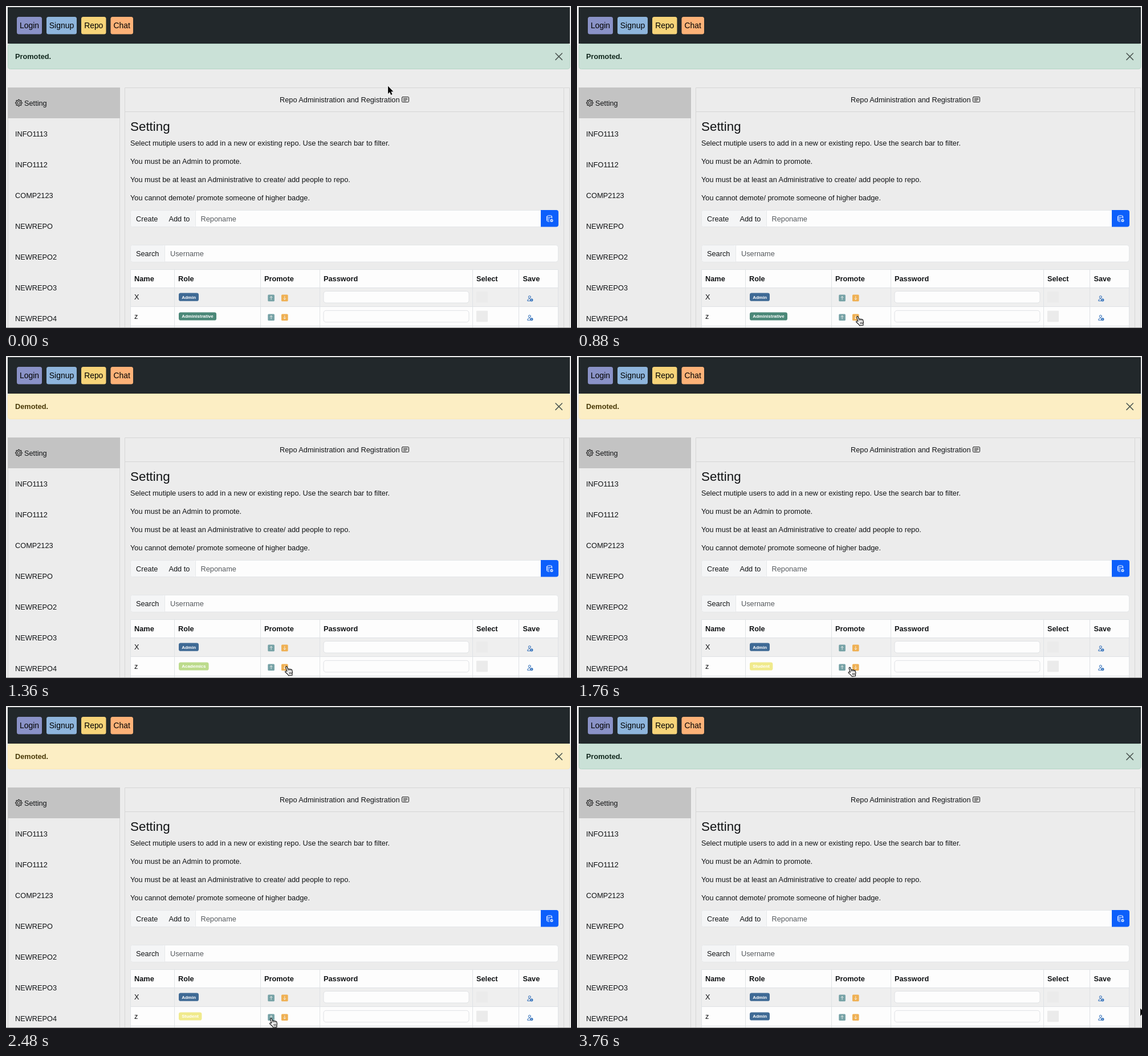
Animation of 991x565 px, one loop 3840 ms. Source, as an HTML page:

```html
<!DOCTYPE html>
<html lang="en">
<head>
<meta charset="utf-8">
<title>Repo administration</title>
<style>
  html, body { margin: 0; width: 100%; height: 100%; overflow: hidden; background: #ececec; }
  svg { display: block; font: 12.75px "Liberation Sans", Arial, sans-serif; }
  text { fill: #111315; white-space: pre; }
  .bold { font-weight: 700; }
  .mid { text-anchor: middle; }
  .nav { font-size: 13.9px; fill: #000; }
  .hint { fill: #55595d; }
  .badge { font-size: 8px; font-weight: 700; fill: #fff; }
  .line { fill: none; stroke: #d6d6d6; }
  .grid { fill: none; stroke: #dfe2e5; }
  .icon { fill: none; stroke: #1a1a1a; stroke-linecap: round; stroke-linejoin: round; }
</style>
</head>
<body>
<svg id="stage" width="991" height="565" viewBox="0 0 991 565"></svg>
<script>
const LOOP = 3840, STEP = 80;
const stage = document.getElementById('stage');

const rect = (x, y, w, h, fill, r = 0, extra = '') =>
  `<rect x="${x}" y="${y}" width="${w}" height="${h}" rx="${r}" fill="${fill}" ${extra}/>`;
const text = (x, y, s, cls = '') => `<text x="${x}" y="${y}" class="${cls}">${s}</text>`;
const path = (d, cls, extra = '') => `<path d="${d}" class="${cls}" ${extra}/>`;

function navbar() {
  const items = [['Login', 19, 44, '#8a92c7'], ['Signup', 71, 53, '#8eb5dc'],
                 ['Repo', 132, 43.5, '#f7d479'], ['Chat', 183.5, 39.5, '#fdb278']];
  return rect(3, 2, 986, 64, '#22282b') + items.map(([s, x, w, c]) =>
    rect(x, 19, w, 30.5, c, 3.5) + text(x + w / 2, 38.8, s, 'nav mid')).join('');
}

function alertBar() {
  return rect(3.5, 66.5, 985.5, 44, '#cae1d7', 4, 'id="bar" stroke="#b4d5c5"') +
    text(16, 93, '', 'bold').replace('<text', '<text id="note"') +
    path('M964 83l11.4 11.4M975.4 83L964 94.4', 'icon', 'style="stroke:#4a5450;stroke-width:1.5"');
}

function gear(cx, cy) {
  let d = '';
  for (let i = 0; i <= 64; i++) {
    const a = i / 64 * 2 * Math.PI, r = 5.1 + 0.75 * Math.tanh(3 * Math.cos(8 * a));
    d += `${i ? 'L' : 'M'}${(cx + r * Math.cos(a)).toFixed(2)} ${(cy + r * Math.sin(a)).toFixed(2)}`;
  }
  return path(d + 'Z', 'icon', 'stroke-width="1.1"') +
    `<circle cx="${cx}" cy="${cy}" r="2.4" class="icon" stroke-width="1"/>`;
}

function sidebar() {
  const names = ['INFO1113', 'INFO1112', 'COMP2123', 'NEWREPO', 'NEWREPO2', 'NEWREPO3', 'NEWREPO4'];
  return path('M3.5 565V143.5H199.5V565', 'line') +
    rect(3, 143, 197, 54, '#c3c3c3') + gear(22.4, 170) + text(32, 174.7, 'Setting') +
    names.map((s, i) => text(16, 228.5 + 54 * i, s)).join('');
}

function card() {
  const lines = ['Select mutiple users to add in a new or existing repo. Use the search bar to filter.',
    'You must be an Admin to promote.',
    'You must be at least an Administrative to create/ add people to repo.',
    'You cannot demote/ promote someone of higher badge.'];
  return path('M208.5 565V143.5H978.5V565M208 185.5H979M979 143.5H988.5V565', 'line') +
    text(480, 168.8, 'Repo Administration and Registration') +
    rect(694.5, 159.6, 12, 9, 'none', 1.3, 'class="icon" stroke-width="1"') +
    path('M697 162.2h7M697 164.2h7M697 166.2h4.5', 'icon', 'stroke-width=".9"') +
    `<text x="218" y="218.8" style="font-size:22.4px">Setting</text>` +
    lines.map((s, i) => text(218, 245 + 31.9 * i, s)).join('');
}

function forms() {
  const field = (y, h, split) => rect(218.5, y, 750, h, '#fdfdfd', 4, 'stroke="#e4e6e8"') +
    rect(219, y + .5, split - 219, h - 1, '#f4f5f6', 3.5) +
    path(`M${split + .5} ${y}v${h}`, 'line', 'style="stroke:#e6e8ea"');
  const db = 'M948.5 369.2c0-2.3 9-2.3 9 0s-9 2.3-9 0v7.2c0 1.3 2 1.8 4.2 1.8' +
    'M957.5 369.2v3.2M948.5 371.7c0 1.3 2 1.7 4.5 1.7M948.5 374.2c0 1.2 2 1.6 3.8 1.6';
  return field(358.5, 29, 332) +
    text(228, 377.5, 'Create') + text(285.5, 377.5, 'Add to') + text(341.5, 377.5, 'Reponame', 'hint') +
    path('M938 358H965a4 4 0 0 1 4 4V383.5a4 4 0 0 1-4 4H938Z', '', 'fill="#0c5ffb"') +
    path(db, 'icon', 'style="stroke:#fff;stroke-width:.95"') +
    `<circle cx="957" cy="376.6" r="2.5" fill="#fff"/>` +
    path('M957 375.3v2.6M955.7 376.6h2.6', 'icon', 'style="stroke:#0c5ffb;stroke-width:.7"') +
    field(419.5, 29.5, 278) +
    text(228, 439, 'Search') + text(288, 439, 'Username', 'hint');
}

function arrowButton(x, y, color, up) {
  const k = up ? -1 : 1, cx = x + 5.8, cy = y + 5.8;
  return rect(x, y, 11.6, 11.6, color, 1.5) +
    path(`M${cx} ${cy - 2.8 * k}V${cy + 2.8 * k}M${cx - 2} ${cy + .8 * k}L${cx} ${cy + 2.8 * k}L${cx + 2} ${cy + .8 * k}`,
      'icon', 'style="stroke:#f4f4f0;stroke-width:.9"');
}

function saveIcon(y) {
  return `<g class="icon" style="stroke:#2d6cb8"><circle cx="918.4" cy="${y + 2.6}" r="2"/>` +
    `<path d="M919.5 ${y + 9.4}H914.6c0-2.6 1.6-3.8 4.2-3.6"/></g>` +
    `<circle cx="921.8" cy="${y + 7.8}" r="2.6" fill="#2d6cb8"/>` +
    path(`M921.8 ${y + 7.4}v1.7M921.8 ${y + 6.2}v.1`, 'icon', 'style="stroke:#fff;stroke-width:.8"');
}

function badge(y, id) {
  return `<g id="${id}">` + rect(303, y, 35, 14.2, '#3f6a95', 3.4) + text(308.2, y + 9.9, 'Admin', 'badge') + '</g>';
}

function table() {
  const heads = [['Name', 225], ['Role', 302], ['Promote', 453], ['Password', 557], ['Select', 825], ['Save', 906.5]];
  const row = (dy, name, id, box) => text(225, 514.7 + dy, name) + badge(503.6 + dy, id) +
    arrowButton(459.3, 506.6 + dy, '#76a2a6', true) + arrowButton(483, 506.6 + dy, '#efb053', false) +
    rect(557, 500.5 + dy, 255, 20.5, '#fdfdfd', 4.5, 'stroke="#dfe1e4"') +
    rect(825, 501 + dy, 20, 19.5, box, 1) + saveIcon(508 + dy);
  return rect(218.5, 462, 750.5, 103, '#fdfdfd') + rect(218.5, 495, 750.5, 33, '#efefef') +
    path('M218.5 565V462.5H968.5V565M218 494.5H969M218 527.5H969M218 561.5H969' +
      [295, 446, 550, 818, 899].map(x => `M${x + .5} 462V565`).join(''), 'grid') +
    heads.map(([s, x]) => text(x, 482.5, s, 'bold')).join('') +
    row(0, 'X', 'role1', '#ebebeb') + row(33.8, 'z', 'role2', '#ebebeb');
}

function cursors() {
  const hand = 'M3.9 9.6L1.7 2.8C1.2 .9 3.5 .2 4.1 1.9L5.6 6C6 5 7.5 4.9 8 6C8.6 5.2 10 5.3 10.4 6.4' +
    'C11.1 5.8 12.4 6.2 12.7 7.3C13.5 9.6 13.9 11.4 13 13.4L12.9 16.4L6.7 17C5.8 14.6 3.3 13 1 11C-.2 9.4 1.8 8.2 3.9 9.6Z';
  return `<g id="hand"><path d="${hand}" fill="#fff" stroke="#111" stroke-width="1.15" stroke-linejoin="round"/>` +
    path('M5.6 6l.7 2.5M8 6l.6 2.2M10.4 6.4l.5 2M7.6 11.2l.6 3.2M9.4 11l.5 3.2M11.2 10.8l.3 3.2', 'icon', 'stroke-width=".8"') + '</g>' +
    path('M0 0V13.4L3 10.6L5.2 15.6L7.5 14.6L5.3 9.7H9.4Z', '', 'id="arrow" fill="#080808" stroke="#fff" stroke-width="1" paint-order="stroke"');
}

stage.innerHTML = rect(0, 0, 991, 565, '#ececec') + navbar() + alertBar() + sidebar() + card() +
  forms() + table() + rect(0, 564, 991, 1, '#8c8c8c') + cursors();

const $ = id => document.getElementById(id);
const bar = $('bar'), note = $('note'), hand = $('hand'), arrow = $('arrow');
const [pill, label] = $('role2').children;

const roles = {
  Admin: [35, '#3f6a95'], Administrative: [66, '#4b8878'],
  Academics: [52.6, '#bcdb8c'], Student: [40.4, '#f0ea8c']
};
const alerts = {
  'Promoted.': ['#cae1d7', '#b4d5c5', '#12291f'],
  'Demoted.': ['#fceec4', '#fbe9b4', '#4a3a08']
};
// start time, role, alert
const states = [[0, 'Administrative', 'Promoted.'], [960, 'Academics', 'Demoted.'], [1440, 'Student', 'Demoted.'],
  [2560, 'Academics', 'Promoted.'], [2960, 'Administrative', 'Promoted.'], [3360, 'Admin', 'Promoted.']];
// cursor moves: from time, to time, start point, end point, shape
const moves = [[0, 560, [670, 140.5], [491, 544.5], 'arrow'], [560, 1680, [489, 543.8], [489, 543.8], 'hand'],
  [1680, 1840, [489, 543.8], [462, 547], 'hand'], [1840, 3440, [462, 547], [462, 547], 'hand'],
  [3440, 3760, [463, 547], [988, 530.5], 'arrow'], [3760, LOOP, [988, 530.5], [988, 530.5], 'arrow']];

const ease = u => u * u * (3 - 2 * u);

function draw(t) {
  const [, role, msg] = states.filter(s => s[0] <= t).pop();
  const [width, color] = roles[role], [bg, edge, ink] = alerts[msg];
  pill.setAttribute('width', width);
  pill.setAttribute('fill', color);
  label.textContent = role;
  bar.setAttribute('fill', bg);
  bar.setAttribute('stroke', edge);
  note.textContent = msg;
  note.style.fill = ink;

  const [t0, t1, a, b, shape] = moves.find(m => t < m[1]);
  const u = ease((t - t0) / (t1 - t0));
  const [x, y] = a.map((v, i) => v + (b[i] - v) * u);
  const on = shape === 'hand' ? hand : arrow;
  hand.style.display = arrow.style.display = 'none';
  on.style.display = '';
  on.setAttribute('transform', `translate(${x.toFixed(2)} ${y.toFixed(2)})`);
}

const start = performance.now();
function tick(now) {
  const t = Math.max(0, now - start) % LOOP;
  draw(Math.floor(t / STEP) * STEP);
  requestAnimationFrame(tick);
}
draw(0);
requestAnimationFrame(tick);
</script>
</body>
</html>
```
